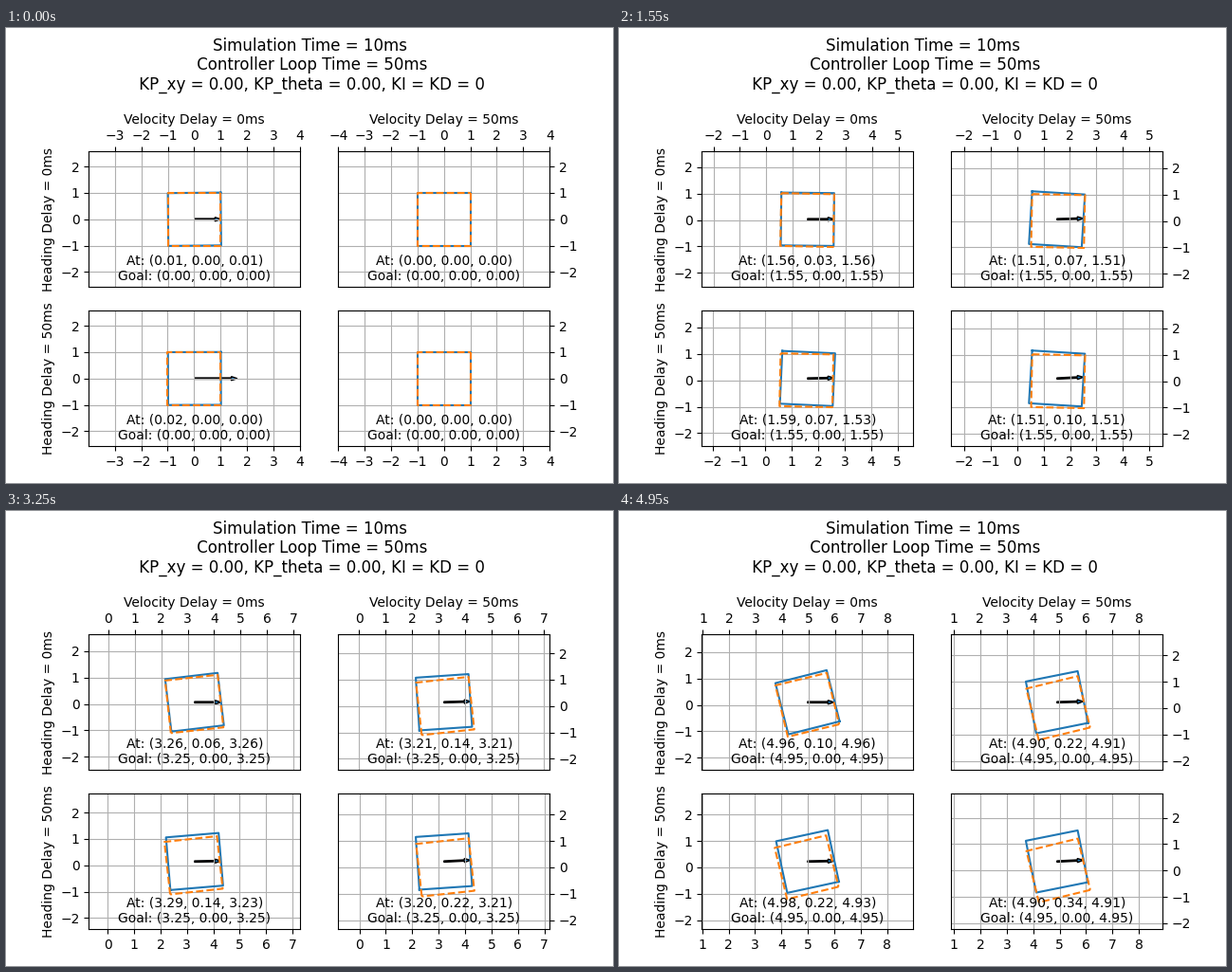
A matplotlib script for the animation above (5 s loop, 640 by 480 pixels).

```python
import numpy as np
import matplotlib.pyplot as plt
from matplotlib.animation import FuncAnimation
from matplotlib.ticker import MultipleLocator

W, H, DPI = 640, 480, 100
DT = 0.01          # simulation step, s
LOOP = 5           # steps per controller update
FRAMES = 100
VIEW_X = 4.0       # half width of the view, data units

CORNERS = np.array([[1, 1], [1, -1], [-1, -1], [-1, 1]], float)
OUTLINE = np.vstack([CORNERS, CORNERS[:1]])


def rotation(a):
    return np.array([[np.cos(a), -np.sin(a)], [np.sin(a), np.cos(a)]])


def wheel_targets(theta):
    """Speeds and headings that drive the body at (1, 0) while turning 1 rad/s."""
    vx, vy = rotation(-theta) @ [1.0, 0.0]
    wx, wy = vx - CORNERS[:, 1], vy + CORNERS[:, 0]
    return np.hypot(wx, wy), np.arctan2(wy, wx)


def simulate(speed_lag, heading_lag):
    """Return one (x, y, theta, vx, vy) row per animation frame."""
    pos, theta = np.zeros(2), 0.0
    speeds, headings, rows = [], [], []
    idle = np.zeros(4)
    for n in range(FRAMES * LOOP):
        if n % LOOP == 0:
            target = wheel_targets(theta)
        speeds.append(target[0])
        headings.append(target[1])
        s = speeds[n - speed_lag] if n >= speed_lag else idle
        h = headings[n - heading_lag] if n >= heading_lag else idle
        wx, wy = s * np.cos(h), s * np.sin(h)
        vel = rotation(theta) @ [wx.mean(), wy.mean()]
        omega = np.sum(CORNERS[:, 0] * wy - CORNERS[:, 1] * wx) / 8
        pos = pos + vel * DT
        theta += omega * DT
        if n % LOOP == 0:
            rows.append((*pos, theta, *vel))
    return np.array(rows)


def pose_text(name, pose):
    return name + ": (" + ", ".join(f"{round(v, 2) + 0.0:.2f}" for v in pose) + ")"


class Panel:
    def __init__(self, fig, row, col):
        left, top = (87.3, 350.3)[col], (130.3, 298.3)[row]
        w, h = 222.9, 142.9
        ax = fig.add_axes([left / W, 1 - (top + h) / H, w / W, h / H])
        self.ax, self.view_y = ax, VIEW_X * h / w
        ax.xaxis.set_major_locator(MultipleLocator(1))
        ax.yaxis.set_major_locator(MultipleLocator(1))
        ax.grid(True)
        if row == 0:
            ax.xaxis.tick_top()
            ax.xaxis.set_label_position("top")
            ax.set_xlabel(f"Velocity Delay = {50 * col}ms")
        if col == 0:
            ax.set_ylabel(f"Heading Delay = {50 * row}ms")
        else:
            ax.yaxis.tick_right()
        self.body, = ax.plot([], [], "C0")
        self.goal, = ax.plot([], [], "C1--")
        self.arrow = ax.arrow(0, 0, 1, 0, width=0.05, length_includes_head=True)
        self.label = ax.text(0.5, 0.03, "", transform=ax.transAxes,
                             ha="center", va="bottom")
        self.rows = simulate(LOOP * col, LOOP * row)

    def update(self, i):
        x, y, theta, vx, vy = self.rows[i]
        t = i * LOOP * DT
        self.body.set_data(*(OUTLINE @ rotation(theta).T + [x, y]).T)
        self.goal.set_data(*(OUTLINE @ rotation(t).T + [t, 0]).T)
        moving = np.hypot(vx, vy) > 1e-6
        self.arrow.set_visible(moving)
        if moving:
            self.arrow.set_data(x=x, y=y, dx=vx, dy=vy)
        self.label.set_text(pose_text("At", (x, y, theta)) + "\n"
                            + pose_text("Goal", (t, 0, t)))
        self.ax.set_xlim(x - VIEW_X, x + VIEW_X)
        self.ax.set_ylim(y - self.view_y, y + self.view_y)


fig = plt.figure(figsize=(W / DPI, H / DPI), dpi=DPI)
fig.suptitle("Simulation Time = 10ms\n Controller Loop Time = 50ms\n"
             " KP_xy = 0.00, KP_theta = 0.00, KI = KD = 0")
panels = [Panel(fig, r, c) for r in range(2) for c in range(2)]


def update(i):
    for p in panels:
        p.update(i)
    return []


anim = FuncAnimation(fig, update, frames=FRAMES, interval=50,
                     repeat=True, repeat_delay=0, blit=False)
plt.show()
```
